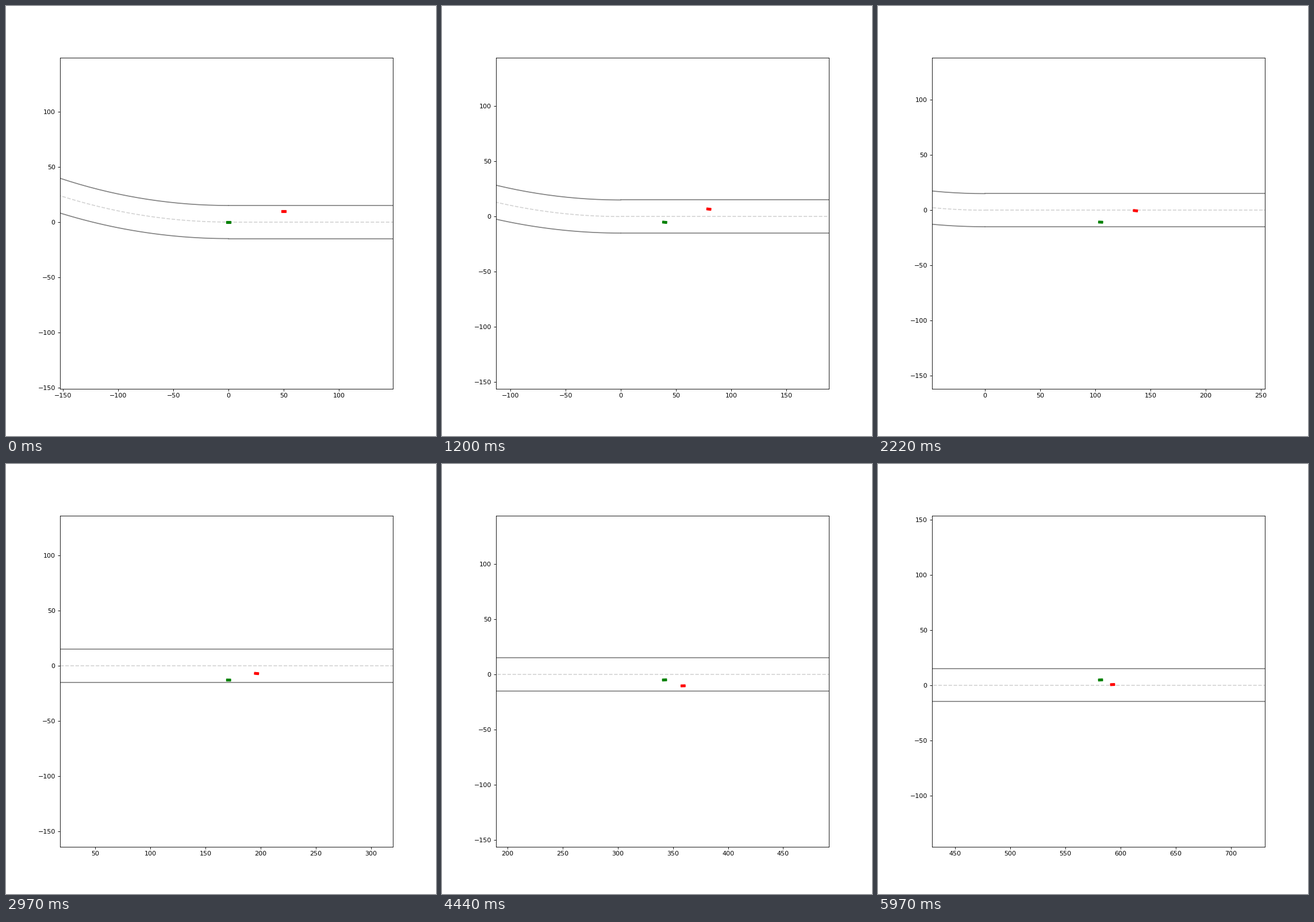
A matplotlib script that plays this animation: 748x748 px, repeating every 6 s.

```python
import numpy as np
import matplotlib.pyplot as plt
from matplotlib.animation import FuncAnimation
from matplotlib.patches import Rectangle

FRAMES, INTERVAL = 200, 30
RADIUS, HALF_ROAD = 500, 15
CAR_L, CAR_W = 4, 2
VIEW = 150
ACCEL = .025


def smooth_path(*keys):
    """Smooth curve through (step, y) keys; returns value and slope."""
    ts, ys = np.array(keys, float).T
    slopes = np.gradient(ys, ts)
    slopes[0] = 0

    def at(n):
        i = min(np.searchsorted(ts, n, side="right"), len(ts) - 1) - 1
        h, rise = ts[i + 1] - ts[i], ys[i + 1] - ys[i]
        m, k = slopes[i:i + 2] * h
        curve = np.polynomial.Polynomial(
            [ys[i], m, 3 * rise - 2 * m - k, m + k - 2 * rise])
        u = (n - ts[i]) / h
        return curve(u), curve.deriv()(u) / h

    return at


def drive(start, speed, lift=0, lift_at=0):
    """Constant acceleration, losing `lift` of the speed at one step."""
    def at(n):
        loss = lift if n > lift_at else 0
        return (start + speed * n + ACCEL * n ** 2 / 2 - loss * (n - lift_at),
                speed + ACCEL * n - loss)

    return at


fig, ax = plt.subplots(figsize=(9.35, 9.35), dpi=80)
box = ax.get_window_extent()
half_w = VIEW * box.width / box.height


def draw_road(offset, **style):
    r = RADIUS - offset
    th = np.linspace(np.pi / 2, 3 * np.pi / 2, 500)
    ax.plot(r * np.cos(th), RADIUS + r * np.sin(th), **style)
    ax.plot([0, 1000], [offset, offset], **style)


draw_road(HALF_ROAD, color="gray")
draw_road(-HALF_ROAD, color="gray")
draw_road(0, color="lightgray", linestyle="--")


class Car:
    def __init__(self, color, x, y):
        self.x, self.y = x, y
        self.body = ax.add_patch(
            Rectangle((0, 0), CAR_L, CAR_W, color=color, zorder=3))

    def move(self, n):
        (x, vx), (y, vy) = self.x(n), self.y(n)
        corner = x - CAR_L / 2, y - CAR_W / 2
        self.body.set_xy(corner)
        self.body.set_angle(np.degrees(np.arctan2(vy, vx)))
        return corner


green = Car("green", drive(0, .49, lift=.135, lift_at=120),
            smooth_path((0, 0), (40, -5), (74, -10.75), (118, -12),
                        (124, -11.05), (148, -5.05), (180, 0), (199, 4.6)))
red = Car("red", drive(50, .24),
          smooth_path((0, 10), (40, 6.95), (74, -.25), (124, -11.1),
                      (148, -10.35), (180, -4.3), (199, .4)))


def update(n):
    red.move(n)
    cx, cy = green.move(n)
    ax.set_xlim(cx - half_w, cx + half_w)
    ax.set_ylim(cy - VIEW, cy + VIEW)
    return green.body, red.body


anim = FuncAnimation(fig, update, frames=FRAMES, interval=INTERVAL,
                     init_func=lambda: update(0), repeat=True, repeat_delay=0)
plt.show()
```
